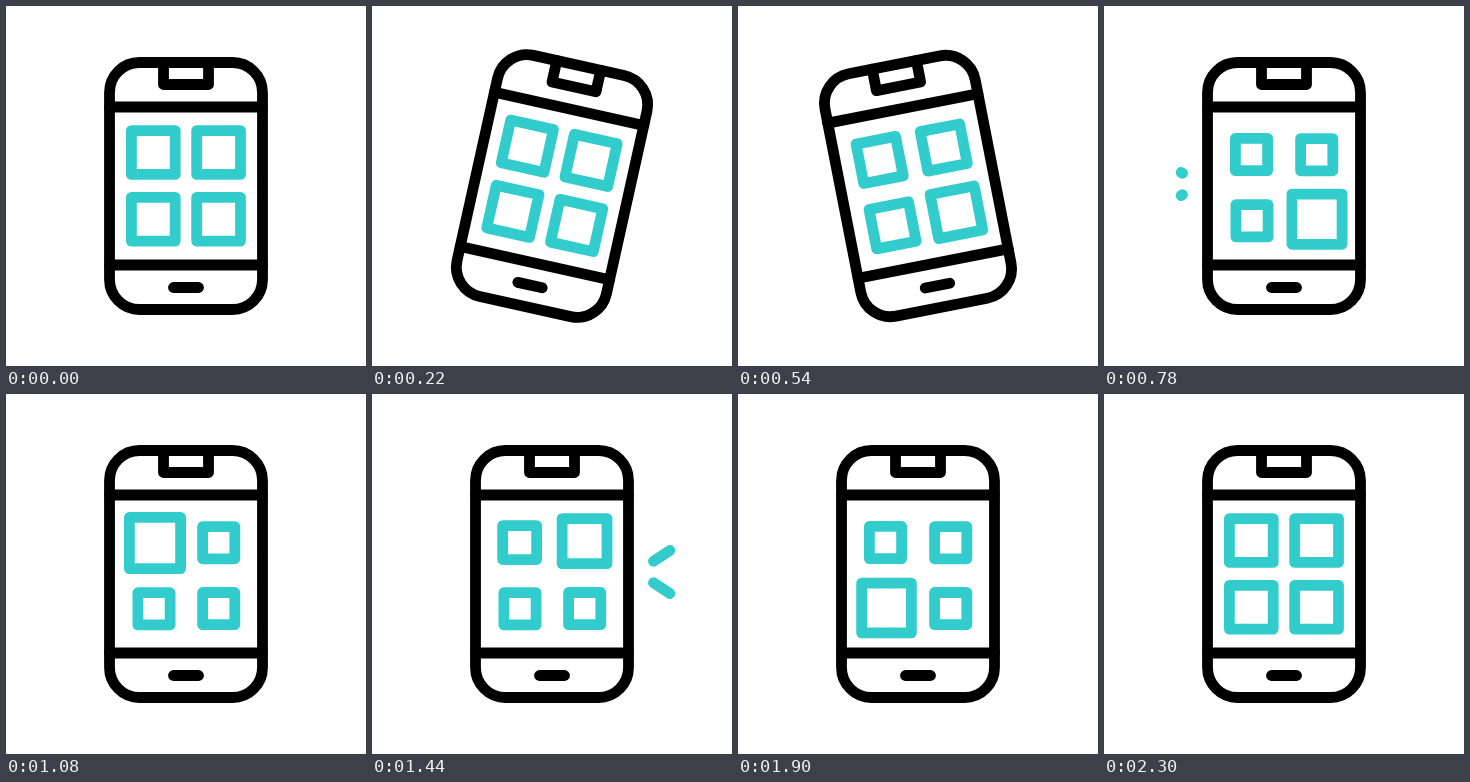
An HTML page that plays this animation: 360x360 px, repeating every 2400 ms.

```html
<!DOCTYPE html>
<html lang="en">
<head>
<meta charset="utf-8">
<title>Phone apps</title>
<style>
  html, body { margin: 0; width: 100%; height: 100%; overflow: hidden; background: #fff; }
  svg { display: block; width: 100%; height: 100%; }
  path, rect { fill: none; stroke-width: 10.8; stroke-linecap: round; stroke-linejoin: round; }
  .body { stroke: #000; }
  .tile, .ray { stroke: #33cccc; }
</style>
</head>
<body>
<svg viewBox="0 0 360 360">
  <g id="phone">
    <g id="tiles"></g>
    <g class="body">
      <rect x="103.5" y="56.5" width="153" height="247" rx="30"/>
      <path d="M103.5 101H256.5M103.5 259H256.5"/>
      <path d="M157.5 56.5V78.5H202.5V56.5"/>
      <path d="M167.5 281.5H192.5"/>
    </g>
  </g>
  <g id="rays"></g>
</svg>
<script>
const LOOP = 2400, STEP = 20;
const clamp = v => Math.max(0, Math.min(1, v));
const mix = (a, b, p) => a + (b - a) * p;
const sine = p => (1 - Math.cos(Math.PI * p)) / 2;
const cubic = p => p < 0.5 ? 4 * p ** 3 : 1 - 4 * (1 - p) ** 3;
const phone = document.getElementById('phone');

function add(parent, name, cls) {
  const el = document.createElementNS('http://www.w3.org/2000/svg', name);
  el.setAttribute('class', cls);
  return document.getElementById(parent).appendChild(el);
}

// Poses are [centre x, centre y, outer size].
const tiles = [
  { rest: [147.3, 146.5, 54.6], small: [147.5, 148.5, 43], big: [149, 149, 62] },
  { rest: [212.6, 146.5, 54.6], small: [212.7, 148.7, 43], big: [212.5, 146.5, 60.5] },
  { rest: [147.3, 213.2, 54.6], small: [148, 214.8, 43], big: [148.5, 214, 60.5] },
  { rest: [212.6, 213.2, 54.6], small: [212.7, 214.6, 43], big: [213, 213.2, 61] }
];
tiles.forEach(t => t.el = add('tiles', 'rect', 'tile'));

// Each move enlarges one tile; -1 brings them all back.
const moves = [
  { at: 455, dur: 240, pick: 3 },
  { at: 765, dur: 305, pick: 0, side: -1 },
  { at: 1295, dur: 245, pick: 1, side: 1 },
  { at: 1640, dur: 255, pick: 2 },
  { at: 2050, dur: 245, pick: -1, side: -1 }
];

const swing = [[90, 0], [288, 17], [455, -17], [666, 0]];
const rays = [-1, 1].map(dir => ({ dir, el: add('rays', 'path', 'ray') }));

function angle(t) {
  for (let i = 1; i < swing.length; i++) {
    const [t0, a] = swing[i - 1], [t1, b] = swing[i];
    if (t >= t0 && t < t1) return mix(a, b, sine((t - t0) / (t1 - t0)));
  }
  return 0;
}

function poseName(i, pick) {
  return pick < 0 ? 'rest' : pick === i ? 'big' : 'small';
}

function drawTile(tile, i, t) {
  let from = 'rest', pose = tile.rest;
  for (const m of moves) {
    if (t < m.at) break;
    const to = poseName(i, m.pick);
    const dur = tile[to][2] < tile[from][2] ? m.dur * 0.83 : m.dur;
    const p = cubic(clamp((t - m.at) / dur));
    pose = tile[from].map((v, k) => mix(v, tile[to][k], p));
    from = to;
  }
  const [x, y, size] = pose, s = size - 10.8;
  const box = { x: x - s / 2, y: y - s / 2, width: s, height: s };
  for (const k in box) tile.el.setAttribute(k, box[k]);
}

function drawRays(t) {
  const m = moves.find(m => m.side && t >= m.at && t < m.at + m.dur);
  const p = m ? (t - m.at) / m.dur : 0;
  const head = clamp(p / 0.76), tail = clamp((p - 0.6) / 0.4);
  for (const { dir, el } of rays) {
    const point = u => `${180 + m.side * (101.5 + 21 * u)} ${178 + dir * (10.7 + 14 * u)}`;
    el.setAttribute('d', m && head > tail ? `M${point(tail)}L${point(head)}` : '');
  }
}

function draw(t) {
  phone.setAttribute('transform', `rotate(${angle(t)} 180 180)`);
  tiles.forEach((tile, i) => drawTile(tile, i, t));
  drawRays(t);
}

const start = performance.now();
function tick() {
  const t = (performance.now() - start) % LOOP;
  draw(Math.floor(t / STEP) * STEP);
  requestAnimationFrame(tick);
}
tick();
</script>
</body>
</html>
```
